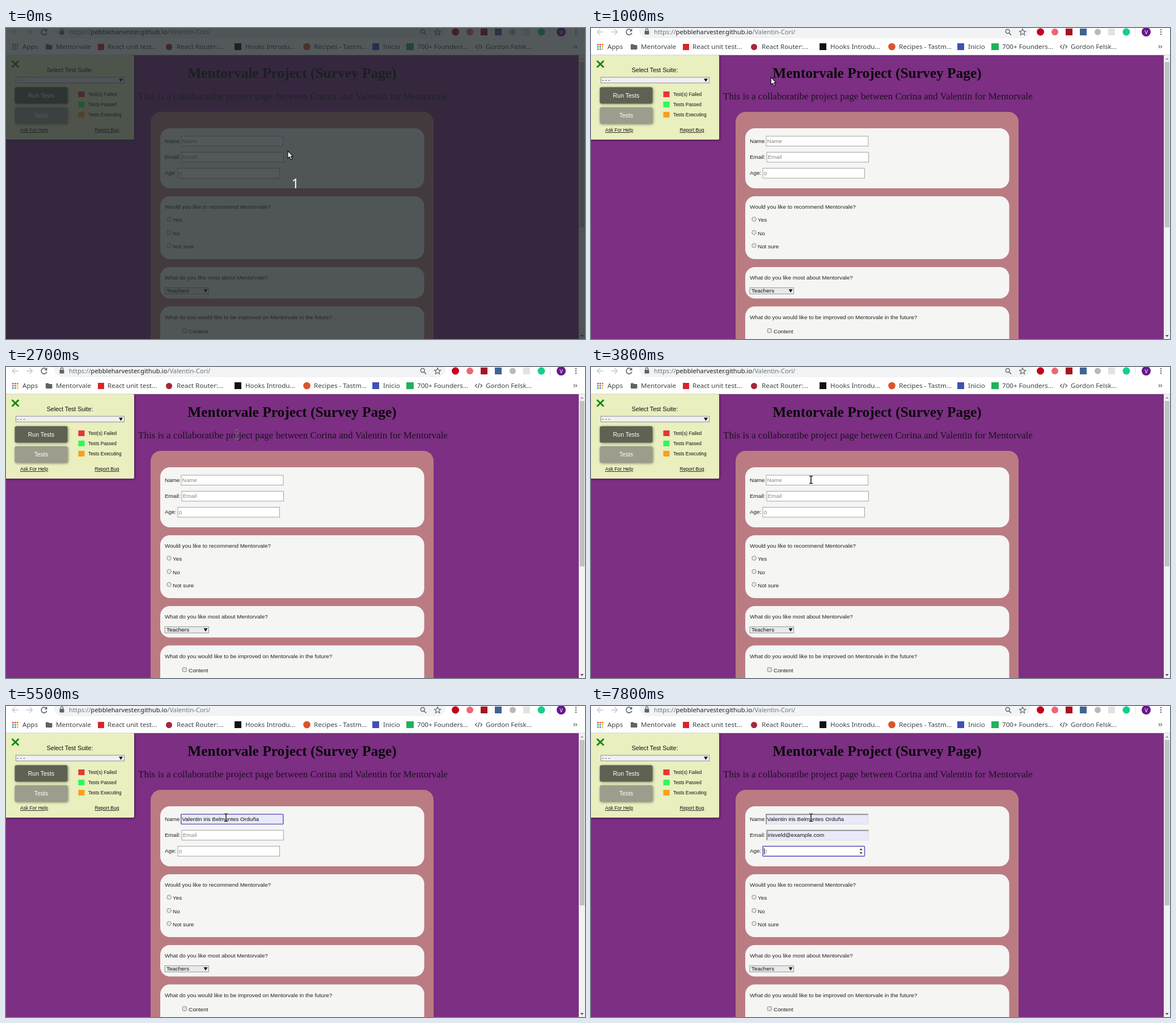
These frames come from a looping animation (1021x549 px, 8 s). An HTML page:

```html
<!DOCTYPE html>
<html lang="en">
<head>
<meta charset="utf-8">
<title>Survey page walkthrough</title>
<style>
  html, body { margin: 0; width: 100%; height: 100%; overflow: hidden; background: #fff; }
  svg { display: block; width: 100%; height: 100%; }
  .sans { font-family: "Liberation Sans", Arial, sans-serif; }
  .ui { font-family: "Noto Sans", "Open Sans", sans-serif; }
  .serif { font-family: "Liberation Serif", "Times New Roman", serif; }
  .shadow { filter: drop-shadow(1px 1px 2px rgba(0, 0, 0, .45)); }
</style>
</head>
<body>
<svg viewBox="0 0 1021 549" preserveAspectRatio="none">
  <defs>
    <clipPath id="selected"><rect id="selectedBox" x="321" y="65" width="0" height="29"/></clipPath>
  </defs>
  <g id="page"></g>
  <g id="live"></g>
  <rect id="dim" width="1021" height="549" fill="#20262a" opacity=".77"/>
  <text id="count" class="ui" x="510" y="283" font-size="23" fill="#fff" text-anchor="middle">1</text>
  <g id="arrow"><path d="M0 0V13L3 10.3L5.2 15.3L7.5 14.3L5.3 9.6H9Z" fill="#fff" stroke="#111" stroke-width="1.1"/></g>
  <g id="beam">
    <path d="M-3 -6.5H-1L0 -5.7L1 -6.5H3M0 -6V6M-3 6.5H-1L0 5.7L1 6.5H3" fill="none" stroke="#fff" stroke-width="3" opacity=".7"/>
    <path d="M-3 -6.5H-1L0 -5.7L1 -6.5H3M0 -6V6M-3 6.5H-1L0 5.7L1 6.5H3" fill="none" stroke="#111" stroke-width="1.5"/>
  </g>
</svg>
<script>
const LOOP = 8000, STEP = 100;
const BODY = 9.9;
const $ = id => document.getElementById(id);

const text = (x, y, str, size = BODY, fill = '#222', cls = 'sans', extra = '') =>
  `<text class="${cls}" x="${x}" y="${y}" font-size="${size}" fill="${fill}" ${extra}>${str}</text>`;
const rect = (x, y, w, h, fill, extra = '') =>
  `<rect x="${x}" y="${y}" width="${w}" height="${h}" fill="${fill}" ${extra}/>`;
const dot = (x, y, r, fill, extra = '') =>
  `<circle cx="${x}" cy="${y}" r="${r}" fill="${fill}" ${extra}/>`;
const line = (d, stroke, width = 1.4, extra = '') =>
  `<path d="${d}" fill="none" stroke="${stroke}" stroke-width="${width}" ${extra}/>`;
const shape = (d, fill) => `<path d="${d}" fill="${fill}"/>`;
const middle = 'text-anchor="middle"';

const title = 'Mentorvale Project (Survey Page)';
const person = 'Valentin iris Belmontes Orduña';
const email = 'irisveld@example.com';
const heading = (fill, extra = '') =>
  text(504.5, 88, title, 25.4, fill, 'serif', `font-weight="bold" ${middle} ${extra}`);

function toolbar() {
  const grey = '#5f6368', pale = '#c4c7ca';
  const bookmark = (x, str) => text(x, 37, str, 11.6, '#3c4043', 'ui');
  const gridColours = ['#ea4335', '#ea4335', '#e8710a', '#34a853', '#4285f4', '#fbbc04', '#34a853', '#4285f4', '#fbbc04'];
  return rect(0, 0, 1021, 48, '#fff')
    + rect(85, -12, 690, 30, '#f1f3f4', 'rx="15"')
    + line('M21.5 7H11.5M16 2L11 7L16 12', pale)
    + line('M36 7H46M41.5 2L46.5 7L41.5 12', pale)
    + line('M71 3.8A5 5 0 1 0 72 8.5', grey, 1.6) + shape('M72.5 1V6H67.5Z', grey)
    + rect(94.5, 5, 8, 6.5, grey, 'rx="1"') + line('M96.3 5V3.5A2.2 2.2 0 0 1 100.7 3.5V5', grey, 1.2)
    + text(111, 11, `https://<tspan fill="#202124">pebbleharvester.github.io</tspan>/Valentin-Cori/`, 11.2, '#70757a', 'ui')
    + dot(734.7, 6, 3.5, 'none', `stroke="${grey}" stroke-width="1.4"`) + line('M737.3 8.8L741 12.5', grey, 1.6)
    + line('M761 1.8L762.6 5.3L766.5 5.8L763.6 8.3L764.5 12.2L761 10.1L757.5 12.2L758.4 8.3L755.5 5.8L759.4 5.3Z', grey, 1.2)
    + dot(792.5, 7, 6.5, '#c4001d') + dot(818, 7, 6, '#ec6673')
    + rect(837, 1, 12, 12, '#a5141f') + rect(862, 1, 12, 12, '#3f6493')
    + dot(893.5, 7, 5.5, '#b9b9b9') + rect(912, 1, 12, 12, '#e2e2e2') + dot(944, 7, 6.5, '#14cf8a')
    + rect(959, 0, 1, 15, '#d5e3f7')
    + dot(979, 7, 8, '#66198c') + text(979, 10.5, 'V', 9.5, '#fff', 'ui', middle)
    + [3, 7, 11].map(y => dot(1005, y, 1.2, grey)).join('')
    + gridColours.map((c, i) => rect(11 + i % 3 * 4, 28 + Math.floor(i / 3) * 4, 2.6, 2.6, c)).join('')
    + bookmark(29, 'Apps')
    + shape('M70 29.5Q70 28.5 71 28.5H74.5L76 30H80.5Q81.5 30 81.5 31V37Q81.5 38 80.5 38H71Q70 38 70 37Z', grey)
    + bookmark(88, 'Mentorvale')
    + rect(162, 28, 11, 11, '#d9252a') + bookmark(179, 'React unit test...')
    + dot(287.5, 33.5, 5.5, '#a4283c') + bookmark(301, 'React Router:...')
    + rect(403, 27, 12, 12, '#111') + bookmark(422, 'Hooks Introdu...')
    + dot(530.5, 33, 6.3, '#da5528') + bookmark(543, 'Recipes - Tastm...')
    + rect(646, 27, 12, 12, '#3f51b5') + bookmark(665, 'Inicio')
    + rect(706, 27, 13, 12, '#1fb25a') + bookmark(725, '700+ Founders...')
    + line('M830.5 30L827.5 33L830.5 36M836.5 30L839.5 33L836.5 36M834.8 28.5L832.2 37.5', '#555', 1.2)
    + bookmark(846, 'Gordon Felsk...')
    + line('M1001 30.5L1003 33L1001 35.5M1004.5 30.5L1006.5 33L1004.5 35.5', '#444', 1.1)
    + rect(0, 47, 1021, 1, '#d8d8d8');
}

function testPanel() {
  const button = (y, fill, label) =>
    `<g class="shadow">${rect(15.5, y, 93, 29, fill, 'rx="3"')}</g>`
    + text(62, y + 18, label, 10.5, '#fff', 'sans', middle);
  const legend = (y, fill, label) => rect(127.5, y, 11, 10, fill) + text(145, y + 8, label, 8.4, '#111');
  const link = 'text-decoration="underline"';
  return `<g class="shadow">${rect(-4, 48, 230, 149, '#e9efbf', 'rx="2"')}</g>`
    + rect(0, 47, 226, 1, '#d8d8d8')
    + line('M10.5 58L22.5 69.5M22.5 58L10.5 69.5', '#0b870b', 2.9)
    + text(112.5, 78, 'Select Test Suite:', 10.6, '#111', 'sans', middle)
    + rect(17.5, 87, 191, 10, '#f0f0f2', 'stroke="#8d8d95"') + text(19.5, 95, '- - -', 9, '#111')
    + shape('M199 89.5H206L202.5 95Z', '#111')
    + button(104.5, '#5f6152', 'Run Tests') + button(140, '#9c9d8c', 'Tests')
    + legend(112, '#e83535', 'Test(s) Failed')
    + legend(130, '#2dfa58', 'Tests Passed')
    + legend(148, '#f8a01e', 'Tests Executing')
    + text(25, 183, 'Ask For Help', 8.5, '#111', 'sans', link)
    + text(156.5, 183, 'Report Bug', 8.5, '#111', 'sans', link);
}

function survey() {
  const panel = (y, h) => rect(272, y, 465.5, h, '#f5f5f3', 'rx="17"');
  const radio = (y, label) =>
    dot(287.5, y, 3.8, '#e6e6e6', 'stroke="#858585" stroke-width=".9"') + text(294, y + 4.5, label);
  return rect(255, 148, 499, 440, '#ba7c82', 'rx="18"')
    + panel(177, 106) + panel(297, 111) + panel(422, 55.5) + panel(491.5, 90)
    + text(280, 202.5, 'Name') + text(280, 231, 'Email:') + text(280, 259, 'Age:')
    + text(280, 319, 'Would you like to recommend Mentorvale?')
    + radio(337.5, 'Yes') + radio(361, 'No') + radio(384, 'Not sure')
    + text(280, 444, 'What do you like most about Mentorvale?')
    + rect(280, 458.5, 77.5, 11, '#e9e9e9', 'stroke="#999"') + text(283, 467, 'Teachers', BODY, '#111')
    + shape('M348.5 461.3H355.5L352 467Z', '#111')
    + text(280, 513.5, 'What do you would like to be improved on Mentorvale in the future?')
    + rect(311.3, 530.8, 7, 7, '#e6e6e6', 'stroke="#858585" rx="1"') + text(322, 538.7, 'Content');
}

function scrollbar() {
  return rect(1010, 48, 11, 501, '#f1f1f1') + rect(1011.5, 60, 8.5, 292, '#c1c1c1')
    + shape('M1012.8 56H1018.6L1015.7 52.5Z', '#a0a0a0') + shape('M1012.8 542H1018.6L1015.7 545.5Z', '#505050');
}

$('page').innerHTML = rect(0, 48, 1021, 501, '#7c2f83')
  + heading('#0a0a0a')
  + text(233, 126, 'This is a collaboratibe project page between Corina and Valentin for Mentorvale', 17, '#1d1020', 'serif')
  + survey() + testPanel() + toolbar() + scrollbar();

const pen = document.createElement('canvas').getContext('2d');
pen.font = `${BODY}px "Liberation Sans", Arial, sans-serif`;

function field(x, y, w, { hint, value = '', filled, focus, caret }) {
  const bg = filled ? '#e8eaf9' : '#fff';
  let out = focus ? rect(x, y, w, 17.5, bg, 'stroke="#6d63c6" stroke-width="1.7" rx="1"')
    : rect(x, y, w, 17.5, bg, `stroke="${filled ? '#dcdcdf' : '#a3a3a3'}"`);
  if (filled && !focus) out += line(`M${x + .3} ${y + 17.5}V${y + .3}H${x + w}`, '#85858c', 1.7);
  out += text(x + 1.7, y + 12, value || hint, BODY, value ? '#111' : '#8a8580');
  if (caret) out += rect(x + 2 + pen.measureText(value).width, y + 3.5, 1, 11, '#111');
  return out;
}

function dropdown(x, y, w, rows, lit) {
  return `<g class="shadow">${rect(x, y, w, rows.length * 28.4 + 12.5, '#fff', 'rx="1"')}</g>`
    + (lit ? rect(x, y + 6, w, 28.4, '#e4e4e6') : '')
    + rows.map((row, i) => text(x + 9.5, y + 25.3 + i * 28.4, row, 12.6, '#202124', 'ui', 'font-weight="500"')).join('');
}

// [time, x, y]
const path = [
  [100, 407, 160], [800, 264, 84], [900, 264, 84], [1400, 531, 99], [1600, 531, 99], [1700, 526, 99],
  [1900, 526, 99], [2100, 502, 112], [2200, 502, 112], [2300, 508, 118], [2700, 407, 119], [3100, 523, 124],
  [3300, 551, 128], [3700, 390, 194], [3800, 388, 199], [4000, 388, 199], [4100, 388, 197]
];

function pointer(t) {
  if (t < 100) return [497, 217];
  const i = path.findIndex(p => p[0] > t);
  if (i < 0) return path[path.length - 1].slice(1);
  const [t0, x0, y0] = path[i - 1], [t1, x1, y1] = path[i];
  const k = (t - t0) / (t1 - t0);
  return [x0 + (x1 - x0) * k, y0 + (y1 - y0) * k];
}

function typedEmail(t) {
  if (t >= 7300) return email;
  return email.slice(0, t < 6500 ? 0 : t < 6700 ? 1 : t < 6900 ? 2 : 3);
}

function draw(t) {
  const [x, y] = pointer(t);
  const within = (a, b) => t >= a && t < b;

  const selectEnd = within(1000, 1400) ? Math.max(321, x) : within(1400, 1800) ? 688 : 321;
  $('selectedBox').setAttribute('width', selectEnd - 321);

  let live = rect(321, 65, selectEnd - 321, 29, '#5508d8') + heading('#fff', 'clip-path="url(#selected)"');
  live += field(308.8, 191, 180, {
    hint: 'Name', value: t >= 5300 ? person : '', filled: t >= 5300,
    focus: within(4100, 5900), caret: within(4200, 5000)
  });
  live += field(310, 219.3, 179.5, {
    hint: 'Email', value: typedEmail(t), filled: t >= 7300,
    focus: within(5900, 7800), caret: within(5900, 7300)
  });
  live += field(303, 247.6, 179.5, { hint: '0', focus: t >= 7800, caret: t >= 7800 });
  if (t >= 7800) live += shape('M473.5 254.5H479L476.2 251.3ZM473.5 258H479L476.2 261.2Z', '#444');
  if (within(4200, 5500))
    live += dropdown(308.5, 209.3, 226.5, [person, 'meal', 'recipes_of_meals', 'meals', 'recipe'], t >= 5200);
  if (within(6600, 7500)) live += dropdown(310, 238, 180, [email], t >= 7300);
  $('live').innerHTML = live;

  const overText = t >= 3700 || (within(2300, 3300) && y > 113);
  const show = (id, on) => $(id).setAttribute('visibility', on ? 'visible' : 'hidden');
  show('dim', t < 100);
  show('count', t < 100);
  show('arrow', !overText);
  show('beam', overText);
  $(overText ? 'beam' : 'arrow').setAttribute('transform', `translate(${x} ${y})`);
}

let start, shown = -1;
function tick(now) {
  start ??= now;
  const t = Math.floor((now - start) % LOOP / STEP) * STEP;
  if (t !== shown) draw(shown = t);
  requestAnimationFrame(tick);
}
draw(0);
requestAnimationFrame(tick);
</script>
</body>
</html>
```
